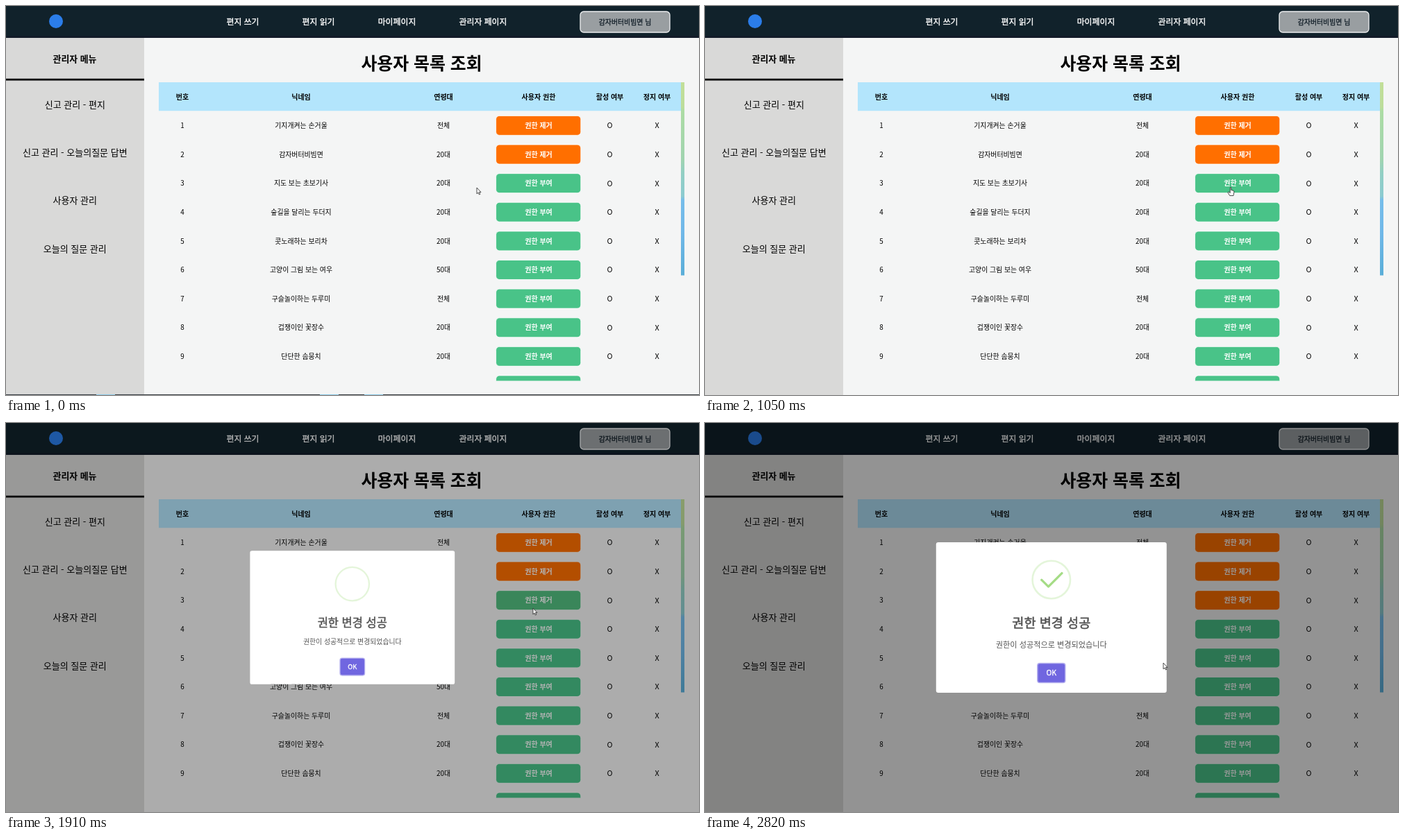
An HTML page that plays this animation: 998 by 561 pixels, repeating every 3770 ms.

```html
<!DOCTYPE html>
<html lang="ko">
<head>
<meta charset="utf-8">
<style>
  html, body { margin: 0; height: 100%; overflow: hidden; background: #f4f5f5; }
  svg { display: block; width: 100vw; height: 100vh; }
  text { font-family: "Noto Sans CJK KR", "Noto Sans CJK", "Noto Sans KR", Inter, sans-serif; text-anchor: middle; }
</style>
</head>
<body>
<svg viewBox="0 0 998 561">
  <defs>
    <linearGradient id="thumb" x2="0" y2="1">
      <stop offset="0" stop-color="#c2df98"/><stop offset=".13" stop-color="#bcdd9b"/>
      <stop offset=".15" stop-color="#acdca4"/><stop offset=".4" stop-color="#a0d4b0"/>
      <stop offset=".47" stop-color="#92cfc4"/><stop offset=".59" stop-color="#8ccbd0"/>
      <stop offset=".61" stop-color="#76bdea"/><stop offset=".78" stop-color="#70b8e8"/>
      <stop offset="1" stop-color="#5aaed8"/>
    </linearGradient>
    <clipPath id="list"><path d="M200 110h798v430.500H200z"/></clipPath>
  </defs>
  <path fill="#f4f5f5" d="M0 0h998v561H0z"/>
  <path fill="#d9d9d8" d="M0 46h199v515H0z"/>
  <path fill="#11222b" d="M0 0h998v46H0z"/>
  <path fill="#131c29" d="M0 43h998v3H0z"/>
  <path d="M0 104.700h199v2.800H0z"/>
  <circle cx="72" cy="22" r="10" fill="#2b7de9"/>
  <rect x="827" y="8" width="129" height="30" rx="5" fill="#999ea1" stroke="#eef0f1" stroke-width="1.300"/>
  <path fill="#b3e5fc" d="M220 110h752v41.300H220z"/>
  <path fill="url(#thumb)" d="M972 110h5v278.500h-5z"/>
  <g id="page"></g>
  <g id="rows" clip-path="url(#list)"></g>
  <g id="edge">
    <path fill="#3c4247" d="M0 560h998v1H0z"/>
    <path fill="#8ecbe8" d="M130 560h27v1h-27zM452 560h27v1h-27zM516 560h27v1h-27z"/>
  </g>
  <path id="shade" d="M0 0h998v561H0z"/>
  <g id="loader">
    <path fill="#81d4fa" d="M466 252.500h15.500v55H466z"/>
    <path fill="#5677f0" d="M491 251h15.500v58H491z"/>
    <path fill="#29b6f6" d="M516 249h15.500v63H516z"/>
  </g>
  <g id="popup">
    <rect x="-166" y="-108.500" width="332" height="217" rx="3.200" fill="#fff"/>
    <g transform="translate(0 -54.500) scale(10.375)" fill="#a5dc86">
      <circle r="2.625" fill="none" stroke="#a5dc86" stroke-opacity=".3" stroke-width=".25"/>
      <path id="arc" fill="none" stroke="#a3cf8c" stroke-width=".25"/>
      <rect id="tip" height=".3125" rx=".125"/>
      <rect id="long" height=".3125" rx=".125"/>
    </g>
    <rect x="-20.800" y="65.200" width="41.600" height="29.600" rx="4" fill="#b7b2ef"/>
    <rect x="-19.300" y="66.700" width="38.600" height="26.600" rx="2.600" fill="#7066e0"/>
    <g id="message"></g>
  </g>
  <g id="cursor" fill="#fff" stroke="#222" stroke-width=".8" stroke-linejoin="round">
    <path id="arrow" d="M0 0V8.800L2 7L3.400 10L4.800 9.400L3.500 6.500H6z"/>
    <path id="hand" d="M-.8 .8Q0 -.4 .8 .8V4.500L4 5.300Q5.200 5.700 4.900 7.300L4 12.500H-1.300L-4 8Q-3.800 6.600-2.500 7.300L-.8 8.600z"/>
  </g>
</svg>
<script>
const $ = id => document.getElementById(id);
const LOOP = 3770, STEP = 65.6, OPEN = 1864;
const GREEN = [73, 195, 136], ORANGE = [255, 111, 0];

function add(parent, tag, attrs, content = '') {
  const node = document.createElementNS('http://www.w3.org/2000/svg', tag);
  for (const key in attrs) node.setAttribute(key, attrs[key]);
  node.textContent = content;
  parent.append(node);
  return node;
}
// Text centred on a point; a thin stroke stands in for the medium weight
const label = (parent, str, x, y, size, fill = '#000', weight = 400) => add(parent, 'text', {
  x, y: y + size * .37, 'font-size': size, 'font-weight': weight === 500 ? 400 : weight,
  fill, stroke: fill, 'stroke-width': weight === 500 ? size * .03 : 0
}, str);

const page = $('page');
[['편지 쓰기', 341], ['편지 읽기', 450], ['마이페이지', 563], ['관리자 페이지', 687]]
  .forEach(([str, x]) => label(page, str, x, 23, 11.9, '#fff', 500));
label(page, '감자버터비빔면 님', 891.5, 23, 9.9, '#14202a', 500);
label(page, '관리자 메뉴', 99, 76, 12.9, '#000', 700);
['신고 관리 - 편지', '신고 관리 - 오늘의질문 답변', '사용자 관리', '오늘의 질문 관리']
  .forEach((str, i) => label(page, str, 99.3, 142 + i * 69.3, 13));
label(page, '사용자 목록 조회', 598.5, 83, 24.9, '#000', 700);

const columns = [254, 425, 630, 767, 869.5, 937.5];
['번호', '닉네임', '연령대', '사용자 권한', '활성 여부', '정지 여부']
  .forEach((str, i) => label(page, str, columns[i], 131, 10, '#000', 700));

const users = [
  ['기지개켜는 손거울', '전체'], ['감자버터비빔면', '20대'], ['지도 보는 초보기사', '20대'],
  ['숲길을 달리는 두더지', '20대'], ['콧노래하는 보리차', '20대'], ['고양이 그림 보는 여우', '50대'],
  ['구슬놀이하는 두루미', '전체'], ['겁쟁이인 꽃장수', '20대'], ['단단한 솜뭉치', '20대'], ['', '']
];
const buttons = users.map(([name, age], i) => {
  const y = 172.4 + i * 41.62, rows = $('rows');
  const box = add(rows, 'rect', { x: 705.6, y: y - 14, width: 122.2, height: 28, rx: 5, stroke: '#fff', 'stroke-width': .8 });
  if (!name) return { box };
  [i + 1, name, age].forEach((str, c) => label(rows, str, columns[c], y, 9.9));
  const text = label(rows, '', columns[3], y, 10, '#fff', 700);
  ['O', 'X'].forEach((str, c) => label(rows, str, columns[4 + c], y, 10.8));
  return { box, text };
});

const message = $('message');
label(message, '권한 변경 성공', 0, 8, 18.6, '#545454', 500);
label(message, '권한이 성공적으로 변경되었습니다', 0, 39.5, 11.15, '#545454');
label(message, 'OK', 0, 80, 10.6, '#fff', 500);

const clamp = u => Math.max(0, Math.min(1, u));
const ease = u => 1 - (1 - clamp(u)) ** 2.3;
const linear = u => u;
const mix = (a, b, u) => a.map((v, i) => v + (b[i] - v) * u);
// Keys are [time, ...values]
function track(keys, t, curve) {
  if (t <= keys[0][0]) return keys[0].slice(1);
  for (let i = 1; i < keys.length; i++) {
    const a = keys[i - 1], b = keys[i];
    if (t <= b[0]) return mix(a, b, curve((t - a[0]) / (b[0] - a[0]))).slice(1);
  }
  return keys[keys.length - 1].slice(1);
}

const path = [
  [0, 678, 262], [590, 671, 302], [656, 692, 302], [721, 717, 298], [850, 742, 276], [1049, 757, 261],
  [1837, 757, 261], [1902, 759, 267], [2034, 745, 283], [2165, 716, 309], [2230, 684, 331], [2820, 660, 346]
];
const pop = [[0, .7], [135, 1.05], [240, .95], [300, 1]];
// Tick strokes: time, centre x, centre y, length
const tipKeys = [[405, -2.44, -1.16, 0], [525, -1.31, -.16, 3.125], [630, -.66, .66, 1.0625], [750, -.906, .469, 1.5625]];
const longKeys = [[488, -.375, 1.03, 0], [630, .78, -.16, 3.4375], [750, .53, .03, 2.9375]];

function stroke(id, keys, t, angle) {
  const [x, y, w] = track(keys, t, ease);
  $(id).setAttribute('width', w);
  $(id).setAttribute('transform', `translate(${x} ${y}) rotate(${angle}) translate(${-w / 2} -.156)`);
}

// Solid arc sweeping counter-clockwise through the lower right half
function sweep(t) {
  const lead = 62 - 360 * clamp((t - 2073) / 298) ** 1.5;
  const from = Math.max(lead, -118), to = Math.min(lead + 180, 62);
  const point = deg => [Math.cos(deg * Math.PI / 180) * 2.625, Math.sin(deg * Math.PI / 180) * 2.625];
  $('arc').setAttribute('d', to - from > .5 ? `M${point(from)}A2.625 2.625 0 0 1 ${point(to)}` : '');
}

const show = (id, on) => $(id).setAttribute('visibility', on ? 'visible' : 'hidden');

function draw(now) {
  const step = Math.floor((now % LOOP + 8) / STEP), t = step * STEP, age = t - OPEN;
  const loading = step === 28, open = age > 0;
  show('edge', step === 0);
  show('loader', loading);
  show('popup', open);
  $('shade').setAttribute('opacity', loading ? .5 : open ? .4 * ease(age / 85) : 0);

  buttons.forEach(({ box, text }, i) => {
    const granted = i < 2 ? 1 : i === 2 ? clamp((t - 1895) / 130) : 0;
    box.setAttribute('fill', `rgb(${mix(GREEN, ORANGE, granted).map(Math.round)})`);
    if (text) text.textContent = granted ? '권한 제거' : '권한 부여';
  });

  $('popup').setAttribute('transform', `translate(498.8 280.5) scale(${track(pop, age, ease)})`);
  sweep(t);
  stroke('tip', tipKeys, age, 45);
  stroke('long', longKeys, age, -45);

  const hand = step > 10 && step < 26;
  show('hand', hand);
  show('arrow', !hand);
  $('cursor').setAttribute('transform', `translate(${track(path, t, linear)})`);
}

const start = performance.now();
(function tick() {
  draw(performance.now() - start);
  requestAnimationFrame(tick);
})();
</script>
</body>
</html>
```
